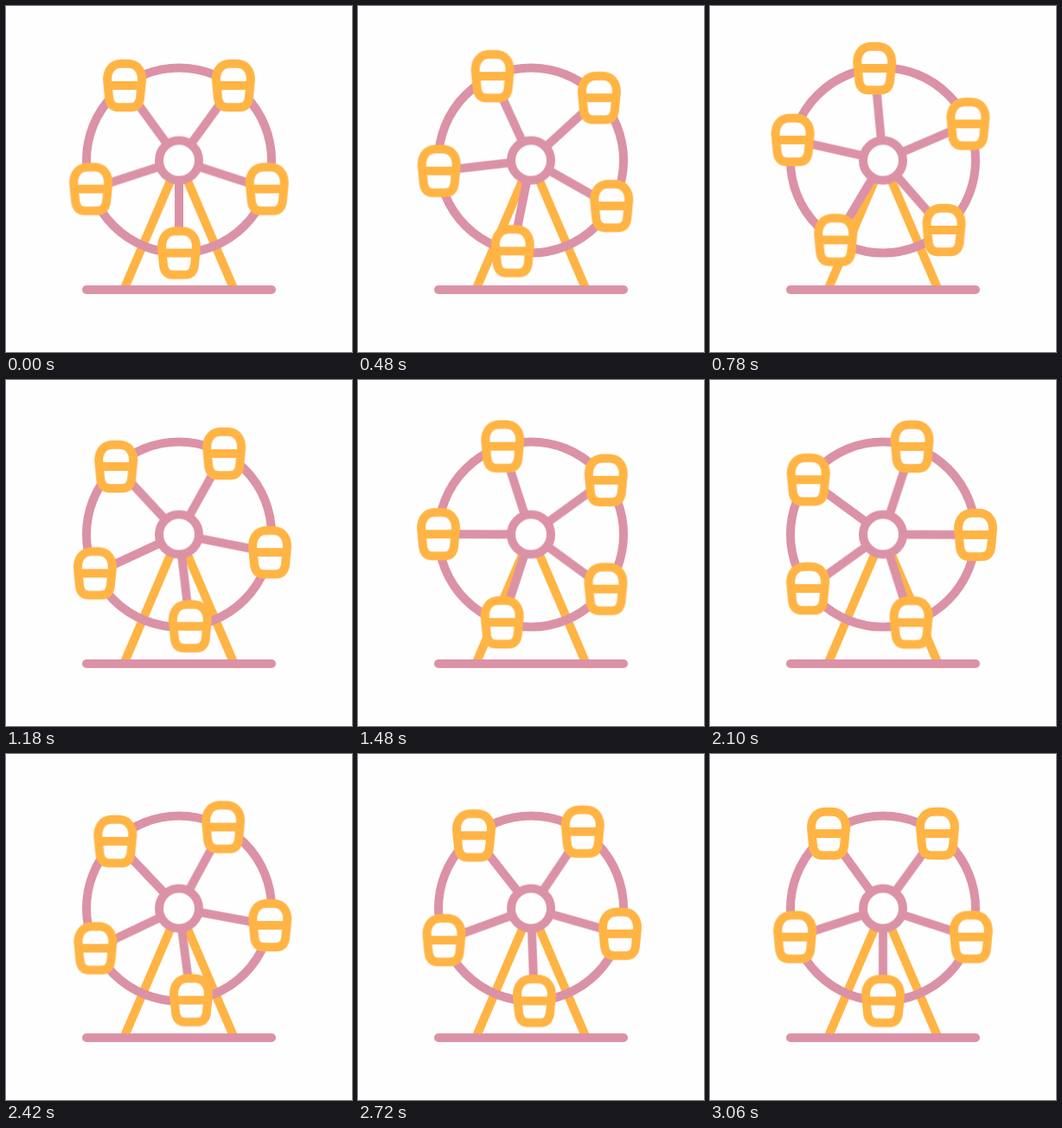
An HTML page that plays this animation: 400x400 px, repeating every 3080 ms.

```html
<!DOCTYPE html>
<html lang="en">
<head>
<meta charset="utf-8">
<title>Ferris wheel</title>
<style>
  html, body { margin: 0; width: 100%; height: 100%; overflow: hidden; background: #fefefe; }
  svg { display: block; width: 100vw; height: 100vh; }
  .pink, .gold { fill: none; stroke-width: 10; }
  .pink { stroke: #db92a6; }
  .gold { stroke: #ffb444; }
  .solid { fill: #fefefe; }
  .wheel, .level {
    transform-origin: 0 0;
    animation: turn 3080ms cubic-bezier(.337, 0, .42, 1) infinite;
  }
  .level { animation-name: unturn; }
  @keyframes turn { to { transform: rotate(144deg); } }
  @keyframes unturn { to { transform: rotate(-144deg); } }
</style>
</head>
<body>
<svg viewBox="0 0 400 400">
  <defs>
    <path id="spoke" d="M0 23V90"/>
    <g id="cabin">
      <path class="solid" d="M-20 -7C-20 -18 -13.500 -25.300 -4 -25.300H4C13.500 -25.300 20 -18 20 -7L18 14C17.300 21.500 13.500 25.300 7 25.300H-7C-13.500 25.300 -17.300 21.500 -18 14Z"/>
      <path d="M-19 0H19"/>
    </g>
  </defs>
  <path class="gold" d="M137.500 325L200 179L262.500 325"/>
  <path class="pink" d="M93 328H307" stroke-linecap="round"/>
  <g transform="translate(200 178.500)">
    <circle class="pink" r="107"/>
    <g class="wheel pink" id="spokes"></g>
    <circle class="pink solid" r="23"/>
    <g class="wheel gold" id="cabins"></g>
  </g>
</svg>
<script>
  const fill = (id, part) => {
    document.getElementById(id).innerHTML =
      [0, 72, 144, 216, 288].map(part).join('');
  };
  fill('spokes', a => `<use href="#spoke" transform="rotate(${a})"/>`);
  // Each cabin turns back against the wheel to stay upright.
  fill('cabins', a => `<g transform="rotate(${a}) translate(0 107) rotate(${-a})">
    <g class="level"><use href="#cabin"/></g></g>`);
</script>
</body>
</html>
```
